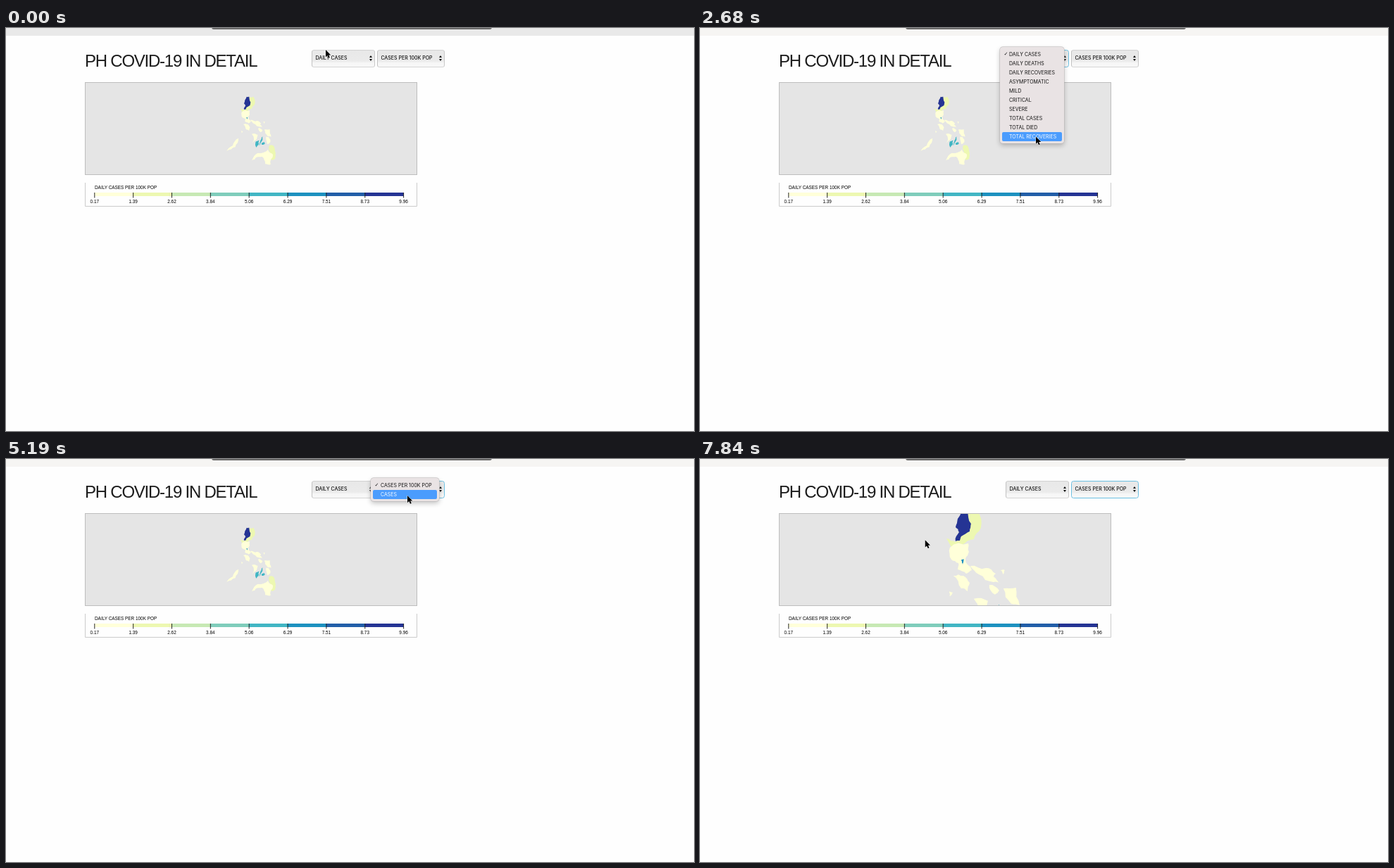
Recreate the animation shown at these times as an HTML page. Size 977 by 573 pixels, loop 7990 ms.

```html
<!DOCTYPE html>
<html lang="en">
<head>
<meta charset="utf-8">
<title>PH COVID-19 in detail</title>
<style>
html, body { margin: 0; width: 100%; height: 100%; overflow: hidden; background: #fefefe; }
body { position: relative; color: #111; font: 7px/13px Inter, "Open Sans", sans-serif; }
body > * { position: absolute; box-sizing: border-box; }
#bar { left: 0; top: 0; width: 100%; height: 10.5px; background: #e9e9e9; }
#bar.active { background: #f6f5f3; }
#address { left: 292px; top: -4px; width: 398px; height: 6px; border-radius: 3px; background: #6b6b6b; }
h1 {
  left: 112px; top: 32px; margin: 0; color: #1c1c1c; white-space: nowrap; font-kerning: none;
  font: 24px/29px "Liberation Sans", Arial, sans-serif; letter-spacing: -1.24px;
}
svg { left: 0; top: 0; overflow: visible; }
svg text { font: 6.4px "Liberation Sans", Arial, sans-serif; fill: #000; }

.select {
  top: 31px; height: 25px; padding-left: 4.4px; line-height: 22.4px; font-weight: 500; white-space: nowrap;
  border: 1.5px solid; border-color: #d2d2d2 #c8c8c8 #d6d6d6 #c2c2c2; border-radius: 3.5px;
  background: linear-gradient(#e8e8e8, #ebebeb 65%, #f7f7f7 78%);
}
.select.focus { border-color: #6cc0e2; }
.select::before, .select::after {
  content: ""; position: absolute; right: 2.7px; border: 2px solid transparent;
}
.select::before { top: 7.4px; border-bottom: 3px solid #111; border-top: 0; }
.select::after { top: 12.2px; border-top: 3px solid #111; border-bottom: 0; }
#metric { left: 434px; width: 90px; }
#unit { left: 527px; width: 95.5px; }

.menu {
  top: 27px; margin: 0; padding: 3.5px 3px; list-style: none; white-space: nowrap; visibility: hidden;
  background: #e9e3e4; border-radius: 4px;
  box-shadow: 0 0 0 .5px #b5b1b2, 0 3px 7px rgba(0, 0, 0, .24);
}
.menu.open { visibility: visible; }
.menu li { position: relative; height: 13px; padding-left: 10px; border-radius: 2px; }
.menu li:first-child::before {
  content: "✓"; position: absolute; left: 2.5px; font: 7px/13px "DejaVu Sans", sans-serif;
}
.menu .hot { background: #4b9cfd; color: #fff; }
#metrics { left: 426px; width: 91px; }
#units { left: 518px; width: 97px; }
#units li { padding-left: 11px; }

#map { transform-origin: 319.7px 115.3px; }
.c1 { fill: #ffffd9; } .c2 { fill: #edf8b1; } .c5 { fill: #41b6c4; }
.c6 { fill: #1d91c0; } .c8 { fill: #253494; }
</style>
</head>
<body>
<div id="bar"></div>
<div id="address"></div>
<h1>PH COVID-19 IN DETAIL</h1>

<svg width="977" height="573">
  <clipPath id="frame"><rect x="113" y="78" width="470" height="130"/></clipPath>
  <rect x="112.5" y="77.5" width="471" height="131" fill="#e5e5e5" stroke="#bdbdbd"/>
  <!-- rough outlines, plotted at full zoom -->
  <g clip-path="url(#frame)"><g id="map">
    <g class="c2">
      <polygon points="379,75 394,74 399,98 389,114 372,122 358,126 350,113 363,118"/>
      <polygon points="448,237 460,237 469,263 467,282 457,287 450,259"/>
    </g>
    <polygon class="c8" points="372,74 380,74 385,92 383,103 371,110 369,116 363,117 368,104 363,97 366,85"/>
    <g class="c1">
      <polygon points="355,126 381,120 382,132 377,142 386,158 378,163 366,157 367,148 357,143"/>
      <polygon points="360,166 374,166 383,176 380,188 371,184"/>
      <polygon points="384,152 406,155 420,163 417,167 427,178 417,175 396,164"/>
      <polygon points="426,158 433,158 431,164"/>
      <polygon points="411,179 425,187 419,193"/>
      <polygon points="431,184 449,183 454,208 442,206"/>
      <polygon points="437,208 446,210 451,226 441,233"/>
      <polygon points="389,199 409,202 405,216 392,230 396,215"/>
      <polygon points="354,188 359,190 355,196"/>
      <polygon points="304,259 325,238 345,213 342,228 319,251"/>
      <polygon points="389,287 401,268 420,263 443,251 460,268 452,301 434,299 424,275 405,277"/>
    </g>
    <polygon class="c6" points="371,144 375,142 373,151"/>
    <g class="c5">
      <polygon points="402,225 414,220 412,234 404,244"/>
      <polygon points="425,207 425,218 414,238 417,225"/>
      <polygon points="422,229 430,225 433,231 423,235"/>
    </g>
  </g></g>
  <path d="M112.500 220V253.500H583.500V220" fill="none" stroke="#ccc"/>
  <text x="126" y="229.300">DAILY CASES PER 100K POP</text>
  <g id="legend" text-anchor="middle"></g>
</svg>

<div class="select" id="metric">DAILY CASES</div>
<div class="select" id="unit">CASES PER 100K POP</div>
<ul class="menu" id="metrics">
  <li>DAILY CASES<li>DAILY DEATHS<li>DAILY RECOVERIES<li>ASYMPTOMATIC<li>MILD
  <li>CRITICAL<li>SEVERE<li>TOTAL CASES<li>TOTAL DIED<li>TOTAL RECOVERIES
</ul>
<ul class="menu" id="units"><li>CASES PER 100K POP<li>CASES</ul>

<svg id="cursor" width="9" height="13">
  <path d="M0 0V10.200L2.300 8.100L4 11.800L5.800 11L4.200 7.400H7.300Z" stroke="#fff" stroke-width=".8" paint-order="stroke"/>
</svg>

<script>
const LOOP = 7990, TICKS = 54;
const $ = id => document.getElementById(id);

let seed = 7;
const random = () => (seed = seed * 16807 % 2147483647) / 2147483647;

// turns straight edges into a ragged coast by shifting their midpoints
function roughen(pts, depth = 2) {
  if (!depth) return pts;
  const out = pts.flatMap(([x, y], i) => {
    const [u, v] = pts[(i + 1) % pts.length], k = (random() - .5) * .3;
    return [[x, y], [(x + u) / 2 + (v - y) * k, (y + v) / 2 - (u - x) * k]];
  });
  return roughen(out, depth - 1);
}
for (const land of document.querySelectorAll('polygon')) {
  const pts = land.getAttribute('points').split(' ').map(p => p.split(',').map(Number));
  land.setAttribute('points', roughen(pts).join(' '));
}

const colors = ['#ffffd9', '#edf8b1', '#c7e9b4', '#7fcdbb', '#41b6c4', '#1d91c0', '#225ea8', '#253494'];
const step = 54.85, tickX = i => 125.8 + i * step;
const bars = colors.map((c, i) => `<rect x="${tickX(i)}" y="234" width="${step}" height="5" fill="${c}"/>`);
const marks = Array.from({ length: 9 }, (_, i) =>
  `<path d="M${tickX(i)} 234v7.500" stroke="#111" stroke-width=".9"/>` +
  `<text x="${tickX(i)}" y="248.700">${(.17 + i * 1.2235).toFixed(2)}</text>`);
$('legend').innerHTML = bars.concat(marks).join('');

// pointer moves: start tick, end tick, goal
const start = [454, 31];
const moves = [
  [0, 2, 467, 37], [6, 8, 471, 38], [12, 13, 473, 37],
  [14, 18, 477, 154.5], [18, 23, 477, 41], [23, 24, 480, 38],
  [25, 27, 495, 35], [27, 31, 566, 39], [34, 35, 570, 52], [35, 38, 572, 39.5],
  [40, 46, 319.7, 115.3]
];
const clamp = k => Math.max(0, Math.min(1, k));
const ease = k => k * k * (3 - 2 * k);

function pointer(n) {
  return moves.reduce(([x, y], [from, to, gx, gy]) => {
    const k = ease(clamp((n - from) / (to - from)));
    return [x + (gx - x) * k, y + (gy - y) * k];
  }, start);
}

function showMenu(id, open, row) {
  const menu = $(id);
  menu.classList.toggle('open', open);
  [...menu.children].forEach((li, i) => li.classList.toggle('hot', open && i === row));
}

function draw() {
  const t = performance.now() % LOOP;
  const n = Math.min(TICKS - 1, Math.floor(t * TICKS / LOOP + .05));
  const [x, y] = pointer(n);
  const row = Math.floor((y - 30.5) / 13);
  $('cursor').style.transform = `translate(${x}px, ${y}px)`;
  $('bar').classList.toggle('active', n >= 8);
  $('metric').classList.toggle('focus', n >= 10 && n < 31);
  $('unit').classList.toggle('focus', n >= 31);
  showMenu('metrics', n >= 10 && n < 26, row);
  showMenu('units', n >= 31 && n < 41, row);
  $('map').style.transform = `scale(${(1 + .226 * Math.max(0, n - 47)) / 2.36})`;
  requestAnimationFrame(draw);
}
draw();
</script>
</body>
</html>
```
